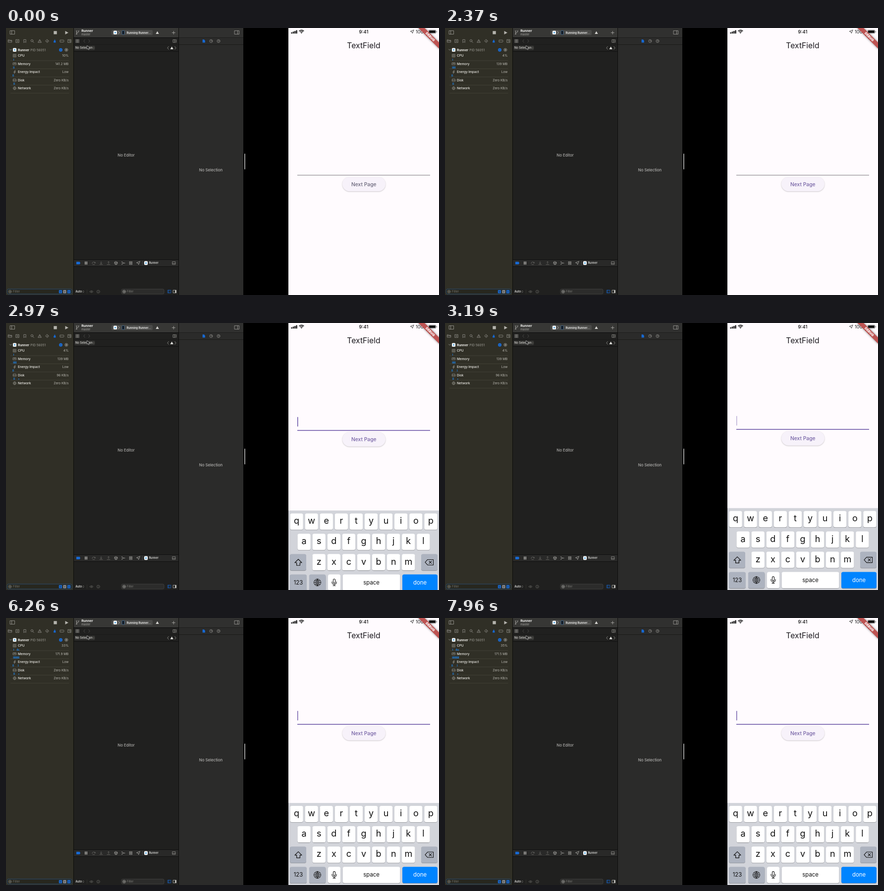
Recreate the animation shown at these times as an HTML page with a canvas. Size 874 px wide and 540 px high, loop 8 s.

```html
<!DOCTYPE html>
<html lang="en">
<head>
<meta charset="utf-8">
<title>TextField profiling</title>
<style>
html, body { margin: 0; width: 100%; height: 100%; overflow: hidden; background: #000; }
canvas { display: block; width: 874px; height: 540px; }
</style>
</head>
<body>
<canvas id="stage"></canvas>
<script>
const W = 874, H = 540, LOOP = 8000;
const BLUE = '#1769d2', GREY = '#a2a19c', DIM = '#6b6a66', LIGHT = '#dddcd8';
const PURPLE = '#6750a4';
const canvas = document.getElementById('stage');
const g = canvas.getContext('2d');
const dpr = window.devicePixelRatio || 1;
canvas.width = W * dpr;
canvas.height = H * dpr;

function rect(x, y, w, h, color) {
  g.fillStyle = color;
  g.fillRect(x, y, w, h);
}

function round(x, y, w, h, r, fill, line) {
  g.beginPath();
  g.roundRect(x, y, w, h, r);
  if (fill) { g.fillStyle = fill; g.fill(); }
  if (line) { g.strokeStyle = line; g.lineWidth = 0.8; g.stroke(); }
}

function dot(x, y, r, color) {
  g.beginPath();
  g.arc(x, y, r, 0, 7);
  g.fillStyle = color;
  g.fill();
}

// y is the middle of the capital letters
function text(s, x, y, size, color, weight = 400, align = 'left') {
  g.font = `${weight} ${size}px Inter, "Liberation Sans", sans-serif`;
  g.textAlign = align;
  g.fillStyle = color;
  g.fillText(s, x, y + size * 0.364);
}

function icon(d, x, y, color = GREY, fill = false, width = 0.8) {
  const path = new Path2D(d);
  g.save();
  g.translate(x, y);
  g.lineWidth = width;
  g.lineJoin = g.lineCap = 'round';
  g.fillStyle = g.strokeStyle = color;
  if (fill) g.fill(path); else g.stroke(path);
  g.restore();
}

const ICON = {
  side: 'M-4.5-3.5H4.5V3.5H-4.5ZM-1.5-3.5V3.5',
  sideRight: 'M-4.5-3.5H4.5V3.5H-4.5ZM1.5-3.5V3.5',
  addPane: 'M-3.2-2.7H3.2V2.7H-3.2ZM-.6-2.7V2.7M.6 0H2.2',
  play: 'M-3-3.5L3.5 0L-3 3.5Z',
  branch: 'M-2-2V3M-2 1Q2 1 2-2M-3-3h2M1-3h2M-3 3.5h2',
  folder: 'M-3.5-2.5H-1L0-1.5H3.5V2.5H-3.5ZM-3.5-.5H3.5',
  crossBox: 'M-3-3H3V3H-3ZM-1.3-1.3L1.3 1.3M1.3-1.3L-1.3 1.3',
  bookmark: 'M-2-3H2V3L0 1.2L-2 3Z',
  search: 'M1.5-.8A2.2 2.2 0 1 1-2.9-.8A2.2 2.2 0 1 1 1.5-.8M1 1L3.2 3.2',
  warn: 'M0-2.8L3.2 2.8H-3.2ZM0-.8V1',
  tri: 'M0-2.8L3.2 2.6H-3.2Z',
  diamond: 'M0-3.2L3.2 0L0 3.2L-3.2 0ZM-1 0L0 1L1.3-.8',
  spray: 'M-2 3.2V0L-.5-1.5V-3H1V-1.5L2.2 0V3.2Z',
  tag: 'M-3.8-2H3L4 0L3 2H-3.8Z',
  list: 'M-3-3H3V3H-3ZM-1.5-1H2M0 1H2',
  grid: 'M-3-3H-.6V-.6H-3ZM.6-3H3V-.6H.6ZM-3 .6H-.6V3H-3ZM.6 .6H3V3H.6Z',
  left: 'M1.2-2.8L-1.2 0L1.2 2.8',
  right: 'M-1.2-2.8L1.2 0L-1.2 2.8',
  down: 'M-2-1L0 1L2-1',
  updown: 'M-1.2-.8L0-2L1.2-.8M-1.2 .8L0 2L1.2 .8',
  file: 'M-2.6-3.2H.6L2.6-1V3.2H-2.6Z',
  circle: 'M3 0A3 3 0 1 1-3 0A3 3 0 1 1 3 0',
  hands: 'M0-1.5V0H1.5',
  ask: 'M-.9-.8Q0-2 .9-.8Q.8 0 0 .4M0 1.6V1.7',
  lines: 'M-1.5-.9H1.5M-.9 .3H.9M-.4 1.4H.4',
  over: 'M-3 1A3 2.8 0 0 1 3 0L3-2M3 0L1.2-.4M-2 3H2',
  into: 'M0-3V1.5M-1.5 0L0 1.5L1.5 0M-3 3H3',
  out: 'M0 1.5V-3M-1.5-1.5L0-3L1.5-1.5M-3 3H3',
  cube: 'M0-3L2.8-1.5V1.7L0 3.2L-2.8 1.7V-1.5ZM-2.8-1.5L0 0L2.8-1.5M0 0V3.2',
  graph: 'M-3-2.5L0 0H3M-3 2.5L0 0M-3-2.5V-1.5M-3 2.5V1.5',
  toggles: 'M-2.5-2.7H2.5V-.7H-2.5ZM-2.5 .8H2.5V2.8H-2.5Z',
  arrow: 'M3.2-3.2L.6 3.2L-.4 .4L-3.2-.6Z',
  eye: 'M-3.5 0Q0-4 3.5 0Q0 4-3.5 0M.8 0A.8 .8 0 1 1-.8 0A.8 .8 0 1 1 .8 0',
  bolt: 'M1-3.2L-2 .5H0L-1 3.2L2-.6H0Z',
  disk: 'M-2.4-2.4H2.4L3.2 .2V2.4H-3.2V.2ZM-3.2 .2H3.2',
  chip: 'M-2.8-2.8H2.8V2.8H-2.8ZM-1.2-1.2H1.2V1.2H-1.2Z',
  memory: 'M-3.2-2H3.2V2H-3.2ZM-1.5-2V0M0-2V0M1.5-2V0',
  drawer: 'M-2.8-2.8H2.8V2.8H-2.8ZM-2.8 .8H2.8'
};

function ring(inner, x, y, color) {
  icon(ICON.circle, x, y, color, false, 0.7);
  icon(ICON[inner], x, y, color, false, 0.7);
}

function appTile(x, y) {
  round(x - 3.6, y - 3.8, 7.2, 7.6, 1.6, '#f4f7fa');
  dot(x, y, 1.6, '#54a5e0');
}

function sidebar(t) {
  rect(0, 0, 136, H, '#302f26');
  icon(ICON.side, 13, 9);
  rect(96.3, 6.2, 6.4, 6.4, '#b4b3ad');
  icon(ICON.play, 122.5, 9.5, '#b4b3ad', true);
  ['folder', 'crossBox', 'bookmark', 'search', 'warn', 'diamond', 'spray', 'tag', 'list']
    .forEach((n, i) => icon(ICON[n], 8.2 + i * 15, 26.4, n === 'spray' ? BLUE : GREY, n === 'spray', 0.7));

  icon(ICON.down, 9.5, 44, GREY);
  appTile(17.5, 44.2);
  text('Runner', 24, 44.3, 6.5, '#f0efeb', 700);
  text('PID 56051', 49.3, 44.3, 6.5, '#a09f98');
  dot(110.5, 44.2, 3.5, BLUE);
  rect(108.7, 43.9, 3.6, 0.7, '#3b454a');
  icon(ICON.circle, 121.8, 44.2, GREY);
  rect(120.6, 42.8, 2.4, 2.8, GREY);

  const step = t < 170 ? 0 : t < 4220 ? 1 : t < 5240 ? 2 : t < 7460 ? 3 : 4;
  const rows = [
    ['CPU', ['10%', '4%', '40%', '33%', '35%'][step], 'chip'],
    ['Memory', ['141.2 MB', '139 MB', '168.8 MB', '171.9 MB', '171.5 MB'][step], 'memory'],
    ['Energy Impact', 'Low', 'bolt'],
    ['Disk', t < 2670 || t >= 3600 ? 'Zero KB/s' : '96 KB/s', 'disk'],
    ['Network', 'Zero KB/s', 'circle']
  ];
  rows.forEach(([name, value, pic], i) => {
    const y = 56 + i * 16.45;
    icon(ICON[pic], 17.5, y, '#9b9a92', false, 0.7);
    if (pic === 'circle') icon('M-3 0H3M0-3Q-2.5 0 0 3Q2.5 0 0-3', 17.5, y, '#9b9a92', false, 0.5);
    text(name, 24, y, 6.45, '#efeee9', 500);
    text(value, 126.3, y, 6.45, '#bdbcb5', 400, 'right');
    rect(9, y + 9.7, 118.5, 0.7, '#48473d');
  });

  // one sample per second is added to the gauges
  const bar = (x, base, h) => rect(x, base - h, 0.95, h, '#2277ca');
  const samples = 2 + Math.max(0, Math.floor((t + 860) / 1015));
  bar(15, 66, 4);
  for (let i = 0; i < samples; i++) {
    const x = 14.5 + i * 1.4;
    bar(x, 82, 4.3);
    if (i > 4) bar(x, 66, i === 6 ? 4.6 : 2.4 + i % 2 * 0.5);
  }
  bar(13.2, 98.3, 4.6);
  bar(14.8, 98.3, 4.6);
  if (t >= 3190) bar(24.3, 98.3, 4.6);
  bar(15.2, 115, 4.6);
  bar(16.8, 115, 4.6);
  if (t >= 2670) bar(25.3, 115, 3);

  round(2.5, 528, 130.5, 10, 2.5, '#27271f', '#2b557f');
  ring('lines', 8, 533.2, '#8c8b85');
  text('Filter', 14, 533.2, 5.9, '#77766f');
  [110, 118.5, 127].forEach((x, i) => {
    round(x - 3.2, 530, 6.4, 6.6, 1, i === 1 ? '#8f9092' : BLUE);
    rect(x - 1.8, 532, 3.6, 0.8, '#26303a');
    rect(x - 1.2, 534, 2.4, 0.8, '#26303a');
  });
}

function editor() {
  rect(137, 0, 211, H, '#20201f');
  rect(137, 0, 211, 19, '#373735');
  rect(137, 33.2, 211, 0.8, '#191918');
  rect(137, 47, 211, 0.9, '#101010');
  rect(137, 19, 211, 0.9, '#0b0b0b');
  icon(ICON.branch, 144.5, 9, '#b6b5b1');
  text('Runner', 152.2, 6, 6.7, '#f0f0ee', 700);
  text('master', 152.2, 13.2, 5.6, '#aaa9a5');
  round(213, 4, 83, 10.5, 2.5, '#4a4a48');
  appTile(220.5, 9.3);
  icon(ICON.right, 228, 9.3, LIGHT, false, 0.7);
  round(234.2, 5.5, 4.6, 7.6, 1, '#10151b', '#3d6e9f');
  text('Running Runner...', 243.5, 9.5, 5.7, '#f2f2f0', 600);
  icon(ICON.tri, 305.5, 9.4, '#d5d4d0', true);
  icon('M-3 0H3M0-3V3', 338.3, 9.5, '#b5b4b0');

  icon(ICON.grid, 144.3, 26.4, GREY, false, 0.7);
  icon(ICON.left, 158, 26.4, '#565653');
  icon(ICON.right, 168, 26.4, '#565653');
  icon(ICON.addPane, 340.5, 26.4, GREY, false, 0.7);

  round(138.5, 35.5, 41, 9.5, 2, '#30302e');
  text('No Selection', 140, 40.3, 5.7, LIGHT, 500);
  icon(ICON.updown, 177, 40.3, '#8a8985', false, 0.6);
  icon(ICON.left, 327, 40.3, GREY);
  icon(ICON.tri, 334.7, 40.3, '#dededa', true);
  icon(ICON.right, 342, 40.3, GREY);
  icon('M0 0V7L1.7 5.6L3 8.4L4.2 7.8L3 5.2H5.2Z', 163.6, 35.7, '#050505', true);
  icon('M0 0V7L1.7 5.6L3 8.4L4.2 7.8L3 5.2H5.2Z', 163.6, 35.7, '#d9d9d9', false, 0.6);
  text('No Editor', 242.5, 257.6, 7.8, '#adacaa', 500, 'center');

  rect(137, 468, 211, 14.5, '#292928');
  rect(137, 468, 211, 0.9, '#0d0d0d');
  rect(137, 482, 211, 0.9, '#0d0d0d');
  icon('M-4-2.6H2.7L4 0L2.7 2.6H-4Z', 146, 475.4, BLUE, true);
  rect(159.2, 472.3, 1.7, 6.2, '#b4b3af');
  rect(162.3, 472.3, 1.7, 6.2, '#b4b3af');
  ['over', 'into', 'out', 'cube', 'graph', 'toggles', 'arrow'].forEach((n, i) =>
    icon(ICON[n], 177 + i * 15, 475.4, i < 3 ? DIM : '#b4b3af', false, 0.8));
  rect(275, 471, 0.7, 9, '#4a4a48');
  appTile(282.5, 475.4);
  text('Runner', 288.5, 475.4, 5.6, '#ecece9', 500);
  icon(ICON.drawer, 339, 475.4, GREY, false, 0.7);

  text('Auto', 140.3, 533.2, 5.6, '#e0e0dd', 600);
  icon(ICON.updown, 156, 533.2, GREY, false, 0.6);
  rect(163.3, 529, 0.6, 8, '#393937');
  icon(ICON.eye, 172.5, 533.2, DIM, false, 0.7);
  icon(ICON.circle, 186.3, 533.2, DIM, false, 0.7);
  icon('M0-.3V1.5M0-1.5V-1.4', 186.3, 533.2, DIM, false, 0.7);
  round(233, 528, 86, 10, 2.5, '#2c2c2b', '#454543');
  ring('lines', 238.5, 533.2, '#b4b3af');
  text('Filter', 244, 533.2, 5.6, '#80807c');
  icon('M-3-2.8H3V2.8H-3ZM-1.2-2.8V2.8', 329.8, 533, BLUE);
  icon('M-3-2.8H3V2.8H-3Z', 340.6, 533, '#c5c4c0');
  rect(341.2, 530.2, 2.4, 5.6, '#c5c4c0');
}

function inspector() {
  rect(349, 0, 130, H, '#2b2b2a');
  rect(349, 0, 130, 19, '#30302f');
  rect(349, 19, 130, 0.8, '#1a1a19');
  rect(349, 33.3, 130, 0.8, '#141413');
  icon(ICON.sideRight, 466, 9);
  icon(ICON.file, 399.3, 26.4, BLUE, true);
  ring('hands', 414, 26.4, GREY);
  ring('ask', 429, 26.4, GREY);
  text('No Selection', 413.5, 286.8, 7.8, '#b3b2b0', 500, 'center');
  rect(136, 0, 1, H, '#0c0c0a');
  rect(348, 0, 1, H, '#0c0c0b');
  round(481, 254, 1.9, 32, 0.9, '#a2a2a2');
}

function statusBar() {
  for (let i = 0; i < 4; i++) {
    const h = 2.6 + i * 1.4;
    round(575.5 + i * 3.3, 11.3 - h, 2.4, h, 0.5, '#111');
  }
  g.strokeStyle = '#111';
  for (const [r, w] of [[6.8, 1.5], [4.3, 1.5], [1.3, 2.4]]) {
    g.beginPath();
    g.arc(596.4, 11, r, -Math.PI * 0.76, -Math.PI * 0.24);
    g.lineWidth = w;
    g.stroke();
  }
  text('9:41', 722, 7.6, 9.6, '#111', 500, 'center');
  icon(ICON.arrow, 819.8, 7.5, '#333', false, 0.9);
  text('100%', 827, 7.6, 9.3, '#222');
  round(853, 4, 15, 7, 2, null, '#777');
  round(854, 5, 13, 5, 1.2, '#111');
  round(868.8, 6, 1, 3, 0.5, '#777');
}

function debugBanner() {
  g.save();
  g.translate(W, 0);
  g.rotate(Math.PI / 4);
  g.shadowColor = 'rgba(0,0,0,.5)';
  g.shadowBlur = 4 * dpr;
  rect(-30, 20.6, 60, 8.8, '#bd5352');
  g.shadowColor = 'transparent';
  text('DEBUG', 0, 24.8, 6.7, '#fff', 900, 'center');
  g.restore();
}

// fade-out and fade-in start times of the text cursor, in turn
const BLINKS = [3090, 3500, 3820, 4220, 4520, 5020, 5440, 5840, 6260, 6640, 7040, 7460, 7960];

function cursorAlpha(t) {
  let n = -1;
  while (n + 1 < BLINKS.length && t >= BLINKS[n + 1]) n++;
  if (n < 0) return 1;
  const k = Math.min(2, Math.floor((t - BLINKS[n]) / 100));
  return n % 2 ? [0.3, 0.7, 1][k] : [0.9, 0.45, 0][k];
}

const rowY = row => 5.9 + row * 41.1;

function key(label, x, row, w, color = '#fff', size = 18) {
  const y = rowY(row);
  round(x, y + 0.8, w, 33, 3.7, '#8b8d92');
  round(x, y, w, 33, 3.7, color);
  const shift = size > 15 ? 14.6 : 16;
  text(label, x + w / 2, y + shift, size, color === '#0084ff' ? '#fff' : '#111', 400, 'center');
}

function keyboard(top) {
  const soft = '#adb3bf';
  g.save();
  g.translate(0, top);
  rect(570, 0, 304, 166, '#d2d4da');
  ['qwertyuiop', 'asdfghjkl', 'zxcvbnm'].forEach((letters, row) => {
    const x = 722 - (letters.length - 1) * 15.05 - 13.2;
    [...letters].forEach((c, i) => key(c, x + i * 30.1, row, 26.4));
  });
  key('', 573, 2, 33, soft);
  key('', 838, 2, 33, soft);
  key('123', 573, 3, 34, soft, 11.4);
  key('', 612, 3, 33.4, soft);
  key('', 650, 3, 25.2);
  key('space', 679.7, 3, 115.8, '#fff', 11.4);
  key('done', 800, 3, 71, '#0084ff', 11.4);
  icon('M0-6.5L7 .5H3.4V6H-3.4V.5H-7Z', 590, 105, '#111', false, 1.2);
  icon('M-3.5-5.5H8V5.5H-3.5L-8.5 0ZM-.5-2.5L4.5 2.5M4.5-2.5L-.5 2.5', 854.5, 104.7, '#111', false, 1.1);
  icon('M7 0A7 7 0 1 1-7 0A7 7 0 1 1 7 0M-7 0H7M0-7V7M0-7Q-6.4 0 0 7Q6.4 0 0-7M-5.5-4Q0-1.5 5.5-4M-5.5 4Q0 1.5 5.5 4',
    628.6, 145.5, '#111', false, 0.9);
  icon('M-2-4.5A2 2 0 0 1 2-4.5V0A2 2 0 0 1-2 0ZM-4.5-1V.5A4.5 4 0 0 0 4.5 .5V-1M0 4.5V7M-2.5 7H2.5',
    662.5, 145, '#111', false, 1.1);
  g.restore();
}

// critically damped spring from 0 to 1
function spring(ms) {
  const x = ms * 0.0166;
  return 1 - (1 + x) * Math.exp(-x);
}

function phone(t) {
  rect(570, 0, 304, H, '#fffbfe');
  statusBar();
  text('TextField', 722, 35.6, 15.7, '#1d1b20', 400, 'center');

  // the keyboard moves in 100 ms steps, the field a little ahead of it
  const focused = t >= 2670;
  const age = 20 + Math.floor((t - 2670) / 100) * 100;
  const lift = focused ? -82.7 * spring(age + 9) : 0;

  g.save();
  g.translate(0, lift);
  if (focused) {
    rect(588, 297, 268, 1.5, PURPLE);
    g.globalAlpha = cursorAlpha(t);
    round(588, 270.5, 1.5, 19.5, 0.7, PURPLE);
    g.globalAlpha = 1;
  } else {
    rect(588, 297, 268, 1.2, '#8f8c93');
  }
  g.shadowColor = 'rgba(0,0,0,.24)';
  g.shadowBlur = 2.2 * dpr;
  g.shadowOffsetY = 0.7 * dpr;
  round(679, 301.3, 87, 29, 14.5, '#f7f2fa');
  g.shadowColor = 'transparent';
  text('Next Page', 722.3, 316, 10.3, t < 170 ? '#686579' : '#7562a5', 500, 'center');
  g.restore();

  if (focused) keyboard(H - 165.9 * spring(age));
  debugBanner();
}

function draw(now) {
  const t = now % LOOP;
  g.setTransform(dpr, 0, 0, dpr, 0, 0);
  rect(0, 0, W, H, '#000');
  sidebar(t);
  editor();
  inspector();
  phone(t);
}

let start;
function loop(now) {
  start ??= now;
  draw(now - start);
  requestAnimationFrame(loop);
}
draw(0);
requestAnimationFrame(loop);
</script>
</body>
</html>
```
